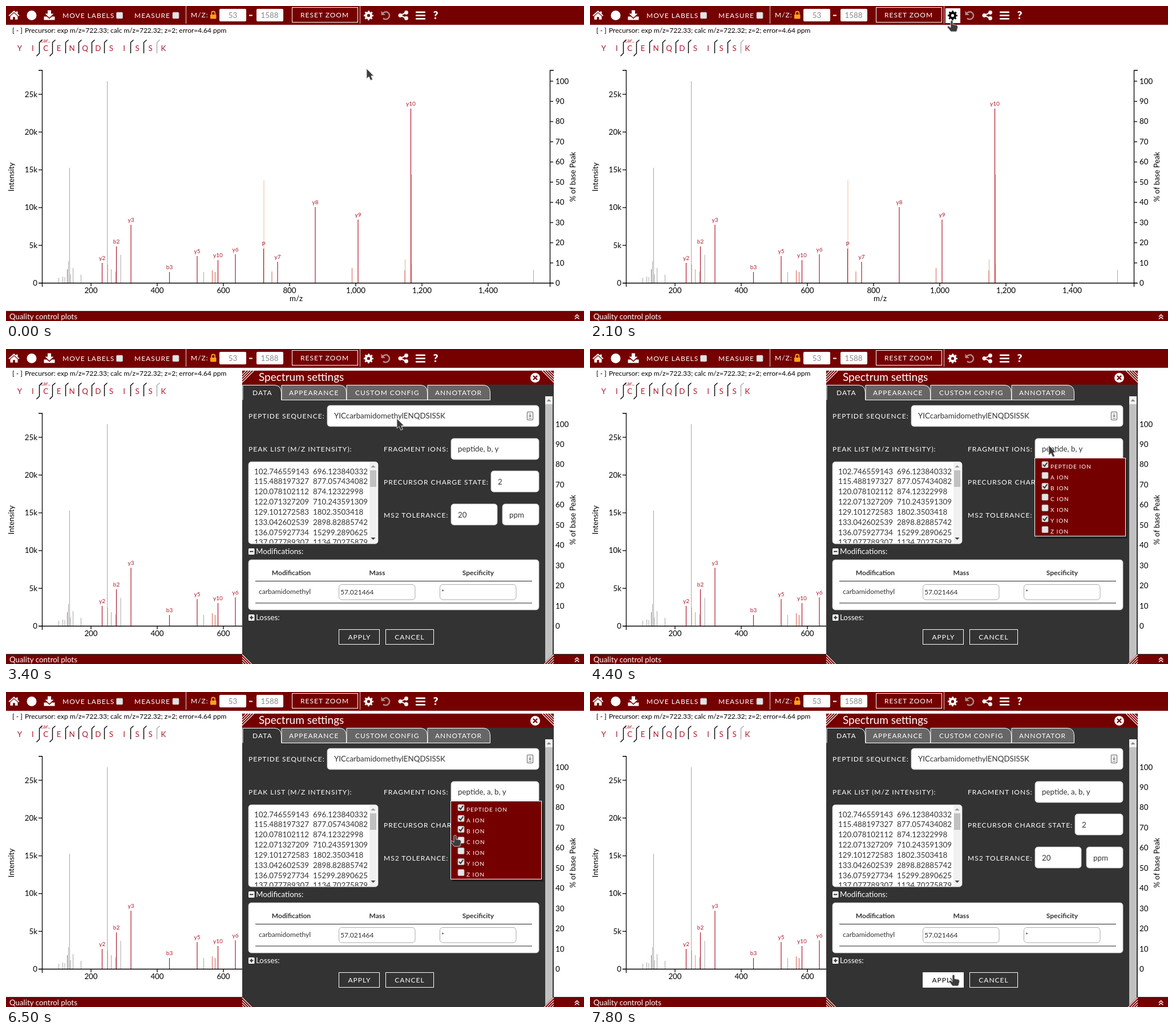
Recreate the animation shown at these times as an HTML page. Size 1013 by 553 pixels, loop 8 s.

```html
<!DOCTYPE html>
<html lang="en">
<head>
<meta charset="utf-8">
<title>Spectrum settings</title>
<style>
  html, body { margin: 0; width: 100%; height: 100%; overflow: hidden; background: #fff; }
  svg { display: block; width: 100vw; height: 100vh; font: 13.33px Lato, sans-serif; }
  text { white-space: pre; }
  .caps { font-size: 12px; letter-spacing: 1px; fill: #fff; }
  .item { font-size: 10px; letter-spacing: 1px; fill: #fff; }
  .small { font-size: 12px; }
  .peak { font-size: 10px; }
  .mid { text-anchor: middle; }
  .end { text-anchor: end; }
  .bold { font-weight: bold; }
  .axis { fill: none; stroke: #000; stroke-width: 1.3; }
  .white { fill: #fff; }
  .red { fill: #750000; }
  .ion { fill: #b2182b; }
  .line { fill: none; stroke: #fff; }
</style>
</head>
<body>
<svg id="stage" viewBox="0 0 1013 553" preserveAspectRatio="none"></svg>
<script>
const RED = '#750000', ION = '#b2182b', LOSS = '#d6604d', PALE = '#f4b793', GREY = '#a6a6a6';

const text = (x, y, s, cls = '', extra = '') => `<text x="${x}" y="${y}" class="${cls}" ${extra}>${s}</text>`;
const rect = (x, y, x2, y2, fill, extra = '') =>
  `<rect x="${x}" y="${y}" width="${x2 - x}" height="${y2 - y}" fill="${fill}" ${extra}/>`;
const path = (d, stroke, width = 1, extra = '') =>
  `<path d="${d}" fill="none" stroke="${stroke}" stroke-width="${width}" ${extra}/>`;
const shape = (d, fill = '#fff', extra = '') => `<path d="${d}" fill="${fill}" ${extra}/>`;
const group = (id, body, extra = '') => `<g id="${id}" ${extra}>${body}</g>`;
const each = (list, fn) => list.map(fn).join('');
const range = n => [...Array(n).keys()];
const field = (x, y, x2, y2) => rect(x, y, x2, y2, '#fff', 'rx="5" stroke="#ccc" stroke-width=".8"');
const button = (x, y, x2, y2) => rect(x + .5, y + .5, x2 - .5, y2 - .5, 'none', 'stroke="#fff"');
const box = (x, y) => rect(x, y, x + 11, y + 11, '#e4e4e4', 'rx="1.5" stroke="#aaa" stroke-width=".8"');
const tick = (x, y) => path(`M${x + 2} ${y + 5.5}l2.7 3l4.5-6.5`, '#333', 2);

function toolbar() {
  return rect(0, 0, 1013, 33, RED)
    + shape('M14 8L4.5 16.5l1.3 1.4L14 10.8l8.200 7.100l1.300-1.400l-3-2.700V9.500h-2.500v2zM14 12.300L7.500 18v5.700h4.700v-4.500h3.600v4.500h4.700V18z')
    + '<circle cx="45" cy="16.500" r="8.500" class="white"/>'
    + shape('M73 7.500h6v6h4.500L76 20.500l-7.500-7H73z')
    + shape('M66.500 18.500h5l4.500 4l4.500-4h5v6h-19z')
    + text(99, 21, 'MOVE LABELS', 'caps') + box(193.500, 11)
    + text(225, 21, 'MEASURE', 'caps') + box(292, 11)
    + path('M315.500 0V31M620.500 0V31', '#e6d5d5')
    + text(324, 20, 'M/Z:', 'caps')
    + rect(358, 15, 368.500, 22.500, '#ffa21a', 'rx="1"')
    + path('M360.300 15V12.500a3 3 0 0 1 6 0V15', '#ffa21a', 1.8)
    + rect(374, 5, 421, 27, '#fff', 'rx="2"') + text(397.500, 21, '53', 'mid', 'fill="#888"')
    + rect(426, 15.500, 432, 17.500, '#fff')
    + rect(439, 5, 486, 27, '#fff', 'rx="2"') + text(462, 21, '1588', 'mid', 'fill="#888"')
    + button(501, 2, 617, 29) + text(516, 20, 'RESET ZOOM', 'caps')
    + group('gearBox', rect(623, 4, 649, 30, '#fff'))
    + group('gear', '<circle cx="635.500" cy="16.700" r="4.600" fill="none" stroke="currentColor" stroke-width="4"/>'
      + '<circle cx="635.500" cy="16.700" r="7" fill="none" stroke="currentColor" stroke-width="3" stroke-dasharray="2.750" stroke-dashoffset="1.370"/>')
    + path('M660 13.500A6.500 6.500 0 1 1 661 21.500', '#b08a8a', 2.5) + shape('M657.500 8.500v7.500h7.500z', '#b08a8a')
    + path('M701.500 11.500L691 16.500L701.500 21.500', '#fff', 2)
    + each([[701.5, 11.5], [691, 16.5], [701.5, 21.5]], ([x, y]) => `<circle cx="${x}" cy="${y}" r="3.400" class="white"/>`)
    + each([9.5, 15.2, 20.9], y => rect(718, y, 735, y + 2.8, '#fff', 'rx=".8"'))
    + text(753, 23, '?', 'mid white', 'style="font-weight:900;font-size:19px"');
}

function sequence() {
  const at = i => 24 + 22.9 * i;
  const marks = [2, 3, 4, 5, 6, 7, 9, 10, 11];
  return text(11, 47, '[ - ]', 'small')
    + text(33, 47, 'Precursor: exp m/z=722.33; calc m/z=722.32; z=2; error=4.64 ppm', 'small')
    + each([...'YICENQDSISSK'], (c, i) => text(at(i), 79, c, 'mid ion'))
    + text(69, 64, 'car..', 'mid ion peak')
    + each(marks, m => {
      const x = Math.round(at(m) - 11.8), tail = m < 4 ? 'V83l-5 5' : 'V83';
      return path(`M${x + 5.5} 59.500l-5 4.500${tail}`, m == 11 ? '#aaa' : '#000', 1.4);
    });
}

// Each peak list alternates x and top.
const unlabelled = [
  [GREY, [92.5, 477, 99.5, 475, 103, 476, 109.5, 448, 111.5, 284, 113, 471, 117.5, 460, 131.5, 472, 177.5, 132,
    184.5, 462, 192, 466, 201, 437, 346.5, 467, 924.5, 463]],
  ['#cdbb9f', [699.5, 445]],
  [PALE, [452, 306, 711, 453, 178.5, 454]],
  [LOSS, [107.5, 462, 361.5, 464, 366.5, 467, 466, 466, 606.5, 460, 699, 464]],
];
const labelled = { y2: [168.5, 451], b2: [193.5, 422], y3: [219, 384], b3: [286.5, 467], y5: [335, 439], y10: [371.5, 446],
  y6: [402, 436], P: [451.5, 426], y7: [476, 449], y8: [542, 353], y9: [617, 375], 'y10 ': [709.5, 180] };

function chart() {
  const stick = (x, top, color, width = 1) => path(`M${x} ${top}V486`, color, width);
  return each(unlabelled, ([color, p]) => each(range(p.length / 2), i => stick(p[2 * i], p[2 * i + 1], color)))
    + each(Object.entries(labelled), ([name, [x, top]]) =>
      stick(x, top, ION, 1.2) + text(x, top - 5, name.trim(), 'mid ion peak'))
    + stick(710.2, 296, LOSS)
    + '<path class="axis" d="M57 113H63.500V486.500H57M63.500 493V486.500H953.500V493M960 113H953.500V486.500H960"/>'
    + each(range(6), i => {
      const y = 486.5 - 66.3 * i;
      return path(`M57 ${y}H63`, '#000', 1.3) + text(55, y + 4.5, i ? i * 5 + 'k' : '0', 'end');
    })
    + each(range(11), i => {
      const y = 486.5 - 35.45 * i;
      return path(`M953 ${y}H959`, '#000', 1.3) + text(963, y + 4.5, i * 10);
    })
    + each(range(7), i => {
      const x = 149 + 116 * i;
      return path(`M${x} 486V492`, '#000', 1.3) + text(x, 504, (200 + 200 * i).toLocaleString('en-US'), 'mid');
    })
    + text(508.5, 518, 'm/z', 'mid')
    + text(0, 0, 'Intensity', 'mid', 'transform="translate(14 300) rotate(-90)"')
    + text(0, 0, '% of base Peak', 'mid', 'transform="translate(998 300) rotate(-90)"')
    + rect(0, 536, 1013, 553, RED) + rect(0, 535.5, 1013, 537, '#200')
    + text(6, 550, 'Quality control plots', 'white')
    + path('M997 545.500l3.700-3.500l3.700 3.500M997 549.500l3.700-3.500l3.700 3.500', '#fff', 1.5);
}

function hatch(x, y, sx, sy) {
  return `<g transform="translate(${x} ${y}) scale(${sx} ${sy})">` + shape('M0 0H22L0 22z', RED)
    + each([7, 11.5, 16, 20.5], d => path(`M0 ${d}L${d} 0`, '#fff', 1.1)) + '</g>';
}

const peaks = ['102.746559143 696.123840332', '115.488197327 877.057434082', '120.078102112 874.12322998',
  '122.071327209 710.243591309', '129.101272583 1802.3503418', '133.042602539 2898.82885742',
  '136.075927734 15299.2890625', '137.077789307 1134.70275879'];
const tabs = [['DATA', 415, 483, 432], ['APPEARANCE', 483, 597, 496],
  ['CUSTOM CONFIG', 597, 739, 612], ['ANNOTATOR', 739, 849, 752]];

function dialog() {
  const arrow = (x, y, dir, fill) => shape(`M${x - 4} ${y}h8l-4 ${4 * dir}z`, fill);
  return rect(414, 38, 960, 553, '#333', 'rx="2"') + rect(414, 38, 960, 62.5, RED)
    + hatch(414, 38, 1, 1) + hatch(960, 38, -1, 1) + hatch(414, 557, 1, -1)
    + text(443, 56, 'Spectrum settings', 'white', 'style="font-size:19px"')
    + '<circle cx="927.500" cy="50.500" r="8.500" class="white"/>' + path('M924 47l7 7m0-7l-7 7', RED, 2.4)
    + each(tabs, ([name, x, x2, tx], i) =>
      shape(`M${x} 89.500V63.500H${x2 - 12}Q${x2 - 1} 64 ${x2 - .5} 76V89.500`, i ? '#666' : '#333', 'stroke="#fff"')
      + text(tx, 80.500, name, 'caps'))
    + path('M483 89.500H849', '#fff')
    + rect(945, 83, 958, 553, '#c1c1c1') + rect(945, 83, 958, 97, '#f1f1f1') + arrow(951.5, 92, -1, '#888')
    + hatch(960, 557, -1, -1)
    + text(425, 122, 'PEPTIDE SEQUENCE:', 'caps') + field(563, 99, 934, 136)
    + text(575, 122, 'YICcarbamidomethylENQDSISSK', '', 'fill="#333"')
    + rect(913.5, 110.5, 923.5, 124.5, '#fff', 'rx="1.500" stroke="#888" stroke-width="1.500"')
    + path('M918.500 113v6m-2-2l2 2l2-2M916 121.500h5', '#777', 1.2)
    + text(425, 180, 'PEAK LIST (M/Z INTENSITY):', 'caps') + field(425, 198, 652, 342)
    + `<clipPath id="listClip"><rect x="425" y="198" width="213" height="143"/></clipPath><g clip-path="url(#listClip)" fill="#333">`
    + each(peaks, (p, i) => each(p.split(' '), (s, k) => text(435 + 103 * k, 219.5 + 17.85 * i, s))) + '</g>'
    + rect(637, 199, 650, 341, '#f1f1f1') + rect(638, 213, 649, 242, '#c1c1c1')
    + arrow(643.5, 208, -1, '#999') + arrow(643.5, 331, 1, '#444')
    + text(662, 180, 'FRAGMENT IONS:', 'caps') + field(780, 157, 934, 194)
    + '<text id="ions" x="792" y="180" fill="#333"></text>'
    + text(662, 238, 'PRECURSOR CHARGE STATE:', 'caps') + field(850, 214, 934, 251) + text(862, 238, '2', '', 'fill="#333"')
    + text(662, 296, 'MS2 TOLERANCE:', 'caps') + field(780, 272, 861, 309) + text(792, 296, '20', '', 'fill="#333"')
    + field(870, 272, 934, 309) + text(882, 296, 'ppm', '', 'fill="#333"')
    + rect(425, 350, 435.5, 361, '#fff', 'rx="1.500"') + path('M427 355.500h6.500', '#333', 2)
    + text(438, 360, 'Modifications:', 'white')
    + rect(425, 466, 435.5, 477, '#fff', 'rx="1.500"') + path('M427 471.500h6.500M430.250 468.200v6.500', '#333', 2)
    + text(438, 476, 'Losses:', 'white')
    + field(425, 370, 934, 458)
    + each([['Modification', 500], ['Mass', 650.5], ['Specificity', 827.5]], ([s, x]) =>
      text(x, 397, s, 'mid small bold', 'fill="#333"'))
    + group('row', rect(437, 407, 922, 446, '#16284f'))
    + path('M437 407.500H922M437 446H922', '#222', 1.2)
    + '<text id="modName" x="443" y="430" class="small">carbamidomethyl</text>'
    + each([[583, '57.021464'], [760, '*']], ([x, s]) =>
      rect(x + .5, 413.5, x + 134, 440, '#fff', 'rx="5" stroke="#aaa"') + text(x + 3, 431, s, 'small', 'fill="#333"'))
    + group('applyFill', rect(584, 492, 655, 519, '#fff'))
    + button(583, 492, 655, 519) + '<text id="apply" x="619.500" y="510" class="caps mid">APPLY</text>'
    + button(665, 492, 750, 519) + text(707.5, 510, 'CANCEL', 'caps mid')
    + group('menu', menu());
}

function menu() {
  return rect(783, 195, 942, 333, '#000', 'opacity=".3"')
    + rect(779.5, 191.5, 938.5, 328.5, RED, 'stroke="#fff"')
    + each(['PEPTIDE', 'A', 'B', 'C', 'X', 'Y', 'Z'], (name, i) => {
      const y = 197.5 + 19 * i, on = tick(792, y);
      const mark = i == 1 ? group('aTick', on) : [0, 2, 5].includes(i) ? on : '';
      return box(792, y) + mark + text(807, y + 12.5, name + ' ION', 'item');
    });
}

const cursors =
  group('arrow', shape('M0 0V17.500L4 14L7 20.500L10.500 19L7.800 12.800H12.500z', '#3c3c3c', 'stroke="#ddd" stroke-width=".9"'))
  + group('hand', shape('M-2 1.500Q0-1.200 2 1.500V7.500L8.500 8.500Q11 9.500 10.500 13L8.500 20H-1.500L-7.500 12.500Q-8 9.500-5 10.500L-2 13z',
    '#3c3c3c', 'stroke="#ddd" stroke-width=".9"'));

const stage = document.getElementById('stage');
stage.innerHTML = rect(0, 0, 1013, 553, '#fff') + toolbar() + sequence() + chart() + group('dialog', dialog()) + group('cursor', cursors);

// Pointer waypoints: time, x, y.
const route = [[0, 632, 110], [1100, 632, 110], [1400, 633, 80], [1700, 634, 42], [1900, 634, 27], [2000, 634, 25],
  [2800, 634, 25], [3000, 612, 42], [3100, 603, 54], [3300, 640, 98], [3500, 730, 146], [3600, 782, 163],
  [3700, 800, 168], [3900, 804, 169], [4600, 804, 169], [5000, 801, 203], [5300, 797, 225], [6200, 797, 225],
  [6500, 787, 251], [7200, 674, 453], [7500, 653, 481], [7800, 637, 496], [8000, 637, 496]];

function pointer(t) {
  const i = route.findIndex(p => p[0] > t);
  const [t0, x0, y0] = route[i - 1], [t1, x1, y1] = route[i];
  const k = (t - t0) / (t1 - t0);
  return [x0 + (x1 - x0) * k, y0 + (y1 - y0) * k];
}

const node = id => document.getElementById(id);
const show = (id, on) => node(id).setAttribute('visibility', on ? 'inherit' : 'hidden');

function draw() {
  const t = Math.floor(performance.now() % 8000 / 100) * 100;
  const during = (a, b) => t >= a && t < b;
  const [x, y] = pointer(t);
  const onGear = during(1900, 2900), open = during(3600, 6600), onRow = during(7100, 7300);
  const onApply = t > 7000 && y > 491 && x < 655, added = t >= 5600;
  const hand = onGear || onApply || open && y > 191;

  show('dialog', t >= 2300);
  show('menu', open);
  show('aTick', open && added);
  show('row', onRow);
  show('applyFill', onApply);
  show('gearBox', onGear);
  show('hand', hand);
  show('arrow', !hand);
  node('gear').style.color = !onGear ? '#fff' : t < 2100 ? '#333' : '#000';
  node('ions').textContent = added ? 'peptide, a, b, y' : 'peptide, b, y';
  node('modName').style.fill = onRow ? '#fff' : '#333';
  node('apply').style.fill = onApply ? '#000' : '#fff';
  node('cursor').setAttribute('transform', `translate(${x} ${y})`);
  requestAnimationFrame(draw);
}
// Nested parts inherit visibility, so a hidden dialog hides them all.
draw();
</script>
</body>
</html>
```
